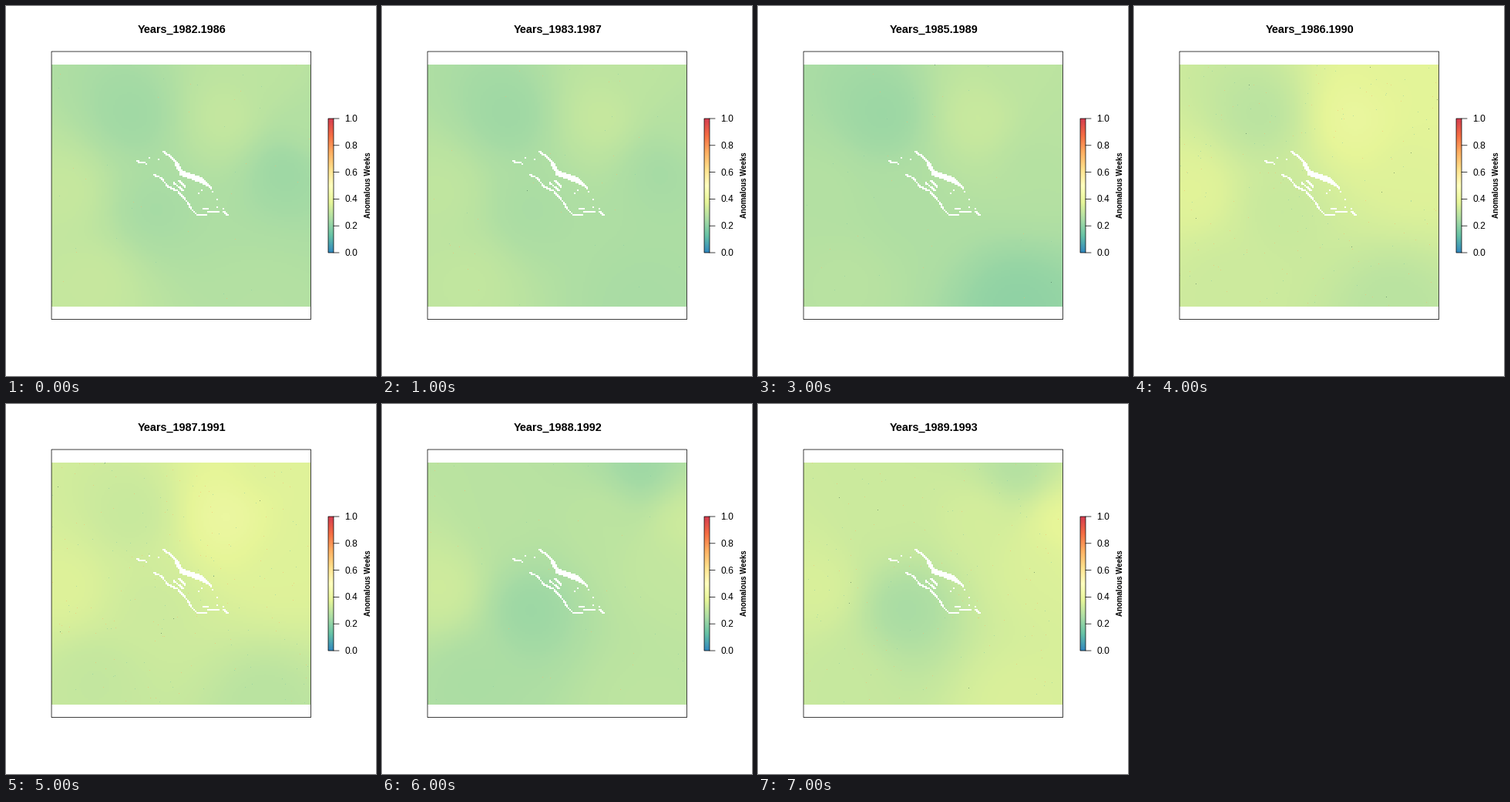
These frames come from a looping animation (480 by 480 pixels, 8 s). A matplotlib script:

```python
import numpy as np
import matplotlib.pyplot as plt
from matplotlib.animation import FuncAnimation
from matplotlib.colors import LinearSegmentedColormap
from matplotlib.patches import Rectangle

SIZE, DPI = 480, 80
PT = 72 / DPI                      # points per pixel
LINE = .75 * PT
LEFT, TOP, CELL = 59, 76, 2
COLS, ROWS = 168, 157
RIGHT, BOTTOM = LEFT + COLS * CELL, TOP + ROWS * CELL
FIRST_YEAR, STEPS = 1982, 8

spectral = LinearSegmentedColormap.from_list("spectral", [
    "#3288BD", "#66C2A5", "#ABDDA4", "#E6F598", "#FFFFBF",
    "#FEE08B", "#FDAE61", "#F46D43", "#D53E4F"], N=512)

# Measuring sites, and their share of anomalous weeks (%) in the key years
SITES = [(165, 142), (288, 146), (360, 208), (335, 386), (190, 265),
         (115, 355), (80, 240), (335, 86), (392, 155)]
READINGS = {
    1982: [23, 31, 22, 27, 24, 31, 31, 29, 27],
    1985: [22, 32, 27, 20, 26, 28, 27, 29, 28],
    1986: [28, 40, 36, 28, 31, 32, 37, 37, 37],
    1987: [31, 41, 36, 28, 32, 30, 36, 36, 36],
    1988: [28, 29, 30, 29, 22, 25, 33, 22, 33],
    1989: [32, 34, 35, 35, 24, 31, 35, 26, 39],
}

# Coastline gaps in the map: (brush size in cells, key points)
STROKES = [
    (1, [(205, 190), (214, 196), (221, 204)]),
    (2, [(220, 203), (226, 213)]),
    (3, [(227, 216), (242, 221), (252, 225)]),
    (2, [(252, 226), (260, 231)]),
    (1, [(260, 230), (267, 238)]),
    (1, [(171, 202), (174, 204), (181, 204)]),
    (1, [(192, 220), (202, 224), (211, 235), (224, 241)]),
    (1, [(224, 242), (236, 255), (242, 265), (248, 271), (261, 272)]),
    (1, [(218, 230), (230, 240)]),
    (1, [(225, 227), (233, 235)]),
    (1, [(257, 264), (262, 263)]),
    (1, [(262, 268), (276, 268)]),
    (1, [(283, 267), (289, 272)]),
]
ISLETS = [(187, 197), (183, 205), (199, 199), (250, 244), (254, 240),
          (268, 241), (274, 252), (274, 261), (283, 263)]


def gap_mask():
    mask = np.zeros((ROWS, COLS), bool)
    for size, pts in STROKES + [(1, [p, p]) for p in ISLETS]:
        for a, b in zip(pts, pts[1:]):
            for x, y in np.linspace(a, b, 16):
                c, r = int((x - LEFT - 1) / CELL), int((y - TOP - 1) / CELL)
                mask[r:r + size, c:c + size] = True
    return mask


def upscale(a):
    return a.repeat(CELL, axis=0).repeat(CELL, axis=1)


gx, gy = np.meshgrid(LEFT + CELL * (np.arange(COLS) + .5),
                     TOP + CELL * (np.arange(ROWS) + .5))
gaps = upscale(gap_mask())


def surface(year):
    """Inverse-distance surface through the sites; missing years are blended."""
    columns = zip(*READINGS.values())
    values = [np.interp(year, list(READINGS), col) / 100 for col in columns]
    weights = [((gx - x) ** 2 + (gy - y) ** 2 + 35 ** 2) ** -1.5 for x, y in SITES]
    return sum(w * v for w, v in zip(weights, values)) / sum(weights)


def add_speckles(img, year, level):
    """Scatter single odd pixels, more of them in more anomalous years."""
    rng = np.random.default_rng(year)
    count = int(40 + 3000 * max(0, level - .28))
    ys, xs = (rng.integers(0, n, count) for n in img.shape[:2])
    tints = np.array([(252, 178, 105), (130, 198, 165), (45, 85, 70)]) / 255
    kinds = rng.choice(3, count, p=[.57, .4, .03])
    img[ys, xs] = (img[ys, xs] + tints[kinds]) / 2


def map_image(year):
    z = surface(year)
    img = upscale(spectral(z)[..., :3])
    add_speckles(img, year, z.mean())
    img[gaps] = 1
    return img


images = [map_image(FIRST_YEAR + i) for i in range(STEPS)]

plt.rcParams["font.family"] = "Liberation Sans"
fig = plt.figure(figsize=(SIZE / DPI, SIZE / DPI), dpi=DPI, facecolor="white")
ax = fig.add_axes([0, 0, 1, 1])
ax.axis("off")


def outline(x0, y0, x1, y1):
    ax.add_patch(Rectangle((x0, y0), x1 - x0, y1 - y0, fill=False, ec="black",
                           lw=LINE, snap=False, zorder=3))


def picture(img, x0, y0, x1, y1):
    return ax.imshow(img, extent=(x0, x1, y1, y0), interpolation="nearest",
                     aspect="auto")


field = picture(images[0], LEFT, TOP, RIGHT, BOTTOM)
outline(59.04, 59.04, 395.5, 406.56)

# Colour key
KEY_TOP, KEY_H = 146, 174
key = (418, KEY_TOP, 425, KEY_TOP + KEY_H)
picture(spectral(np.linspace(1, 0, KEY_H))[:, None, :3], *key)
outline(*key)
for v in np.linspace(0, 1, 6):
    y = KEY_TOP + KEY_H * (1 - v)
    ax.plot([425, 432], [y, y], color="black", lw=LINE, snap=False)
    ax.text(439, y + 4, f"{v:.1f}", size=12 * PT, va="baseline")
ax.text(473, 232, "Anomalous Weeks", size=9.6 * PT, weight="bold", rotation=90,
        rotation_mode="anchor", ha="center", va="baseline")

title = ax.text(228, 35, "", size=14.4 * PT, weight="bold",
                ha="center", va="baseline")
ax.set_xlim(0, SIZE)
ax.set_ylim(SIZE, 0)


def draw(i):
    year = FIRST_YEAR + i
    field.set_data(images[i])
    title.set_text(f"Years_{year}.{year + 4}")
    return field, title


anim = FuncAnimation(fig, draw, frames=STEPS, interval=1000, repeat=True,
                     repeat_delay=0)
plt.show()
```
